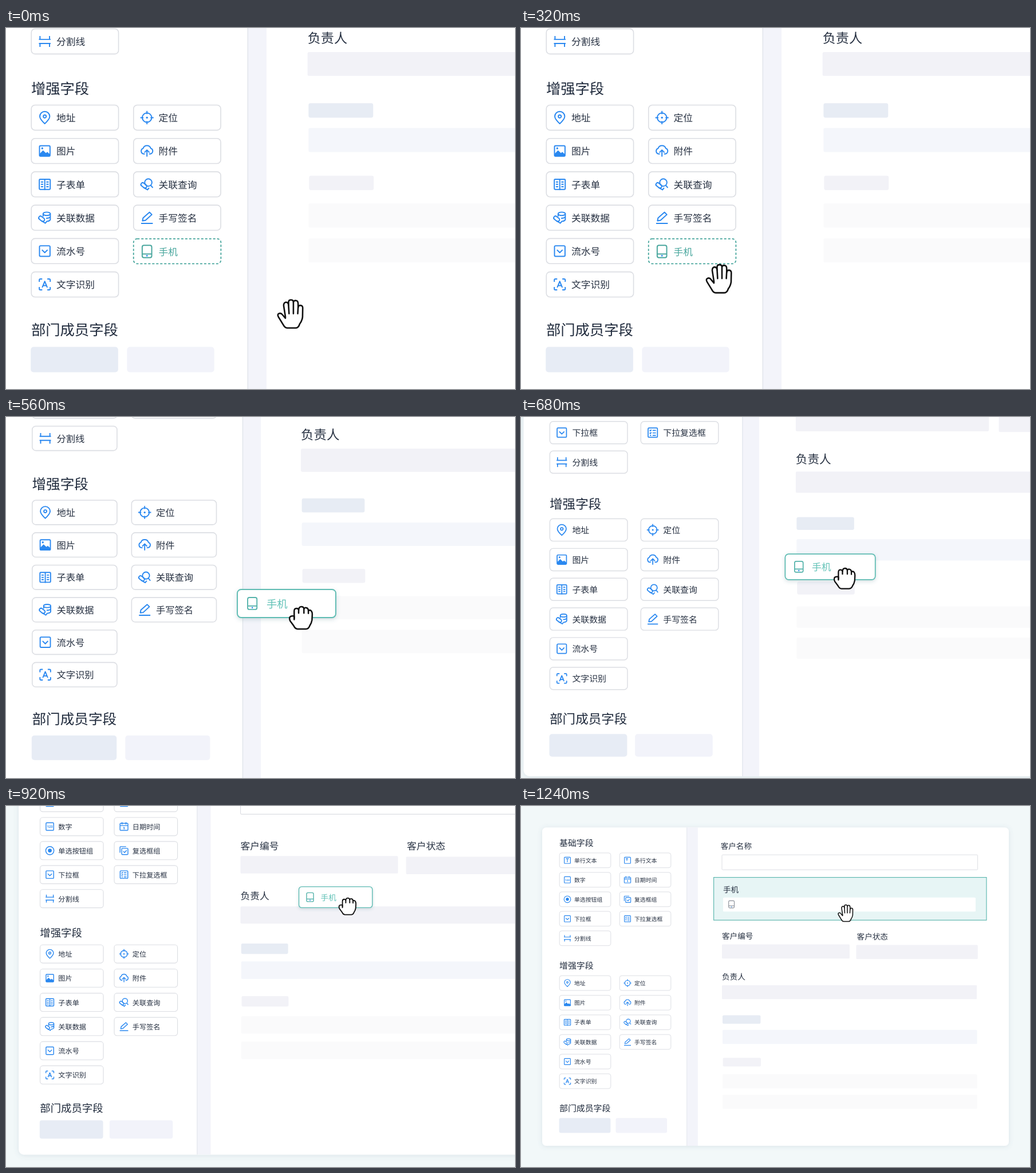
Recreate the animation shown at these times as an HTML page. Size 889 by 630 pixels, loop 2760 ms.

```html
<!DOCTYPE html>
<html lang="zh-CN">
<head>
<meta charset="utf-8">
<title>表单设计</title>
<style>
  html, body { margin: 0; width: 100%; height: 100%; overflow: hidden; background: #f2f8f9; }
  svg { display: block; width: 100%; height: 100%; }
  text { font-family: "Noto Sans CJK SC", "Noto Sans CJK", sans-serif; text-rendering: geometricPrecision; fill: #273142; }
  .head { font-weight: 500; fill: #1f2a3c; }
  .icon { fill: none; stroke: #2a88f0; stroke-width: 1.15; stroke-linejoin: round; }
  .icon .solid { fill: #2a88f0; stroke: none; }
  .icon text { font-family: "Noto Sans", sans-serif; font-weight: 700; fill: #2a88f0; stroke: none; }
  .hand { fill: #fff; stroke: #111; stroke-width: 2.6; stroke-linejoin: round; stroke-linecap: round; }
</style>
</head>
<body>
<svg viewBox="0 0 889 630" xmlns="http://www.w3.org/2000/svg">
  <defs>
    <filter id="panelShadow" x="-10%" y="-10%" width="120%" height="120%">
      <feDropShadow dx="0" dy="1" stdDeviation="4" flood-color="#5a6f8c" flood-opacity=".16"/>
    </filter>
    <filter id="cardShadow" x="-20%" y="-40%" width="140%" height="200%">
      <feDropShadow dx="0" dy="1.5" stdDeviation="2.2" flood-color="#3f6f78" flood-opacity=".22"/>
    </filter>
  </defs>
  <rect width="889" height="630" fill="#f2f8f9"/>
  <g id="camera">
    <rect x="37" y="37.5" width="815" height="555.5" rx="7" fill="#fff" filter="url(#panelShadow)"/>
    <rect x="289.5" y="37.5" width="19.3" height="555.5" fill="#f3f4fa"/>
    <path d="M289.6 37.5V593" stroke="#dfe3ea" stroke-width=".8"/>
    <g id="list"></g>
    <g id="slot"></g>
    <g id="top"></g>
    <g id="lower"></g>
    <rect id="gap" x="350.3" y="130" width="447.4" height="54" rx="2.5" fill="#fff"
      stroke="#5d998e" stroke-width="1" stroke-dasharray="4 3.6"/>
    <g id="field"></g>
    <g id="card"></g>
    <g id="hand">
      <g id="open" class="hand">
        <path d="M-9 -21L-12 -40Q-12 -45.5 -8 -46Q-4 -46 -3.5 -41V-46Q-3.5 -50 .8 -50Q5 -50 5 -46Q5.5 -49 9 -49Q13 -48.5 13.2 -44L13.3 -37Q13.6 -40.5 17.3 -40.5Q21.3 -40 21.3 -36L21 -20Q20 -13 16 -8Q14 -1 9 -1H-6Q-10 -1 -13 -7L-21 -20Q-23.5 -24.5 -20.5 -26Q-17 -28 -14 -24L-9 -18Z"/>
        <path d="M-3.5 -41L-2.6 -26M5 -46V-26M13.3 -38L12.6 -26"/>
      </g>
      <g id="fist" class="hand">
        <path d="M-12 -20V-33Q-12 -38 -8 -38Q-4.5 -38 -4 -35Q-3.5 -41 1 -41Q5 -41 5.5 -37Q7 -40 10 -39Q13.5 -38 13.5 -34Q17 -36 19 -33Q20.5 -31 20.5 -27L20 -17Q19 -11 16 -7Q14 -1 9 -1H-6Q-10 -1 -13 -7L-19 -15Q-21 -19 -20 -22Q-18 -25.5 -12 -24Z"/>
        <path d="M-4 -35V-29.5M5.5 -37V-29.5M13.5 -34V-29M-12 -24V-18"/>
      </g>
    </g>
  </g>
</svg>
<script>
const $ = id => document.getElementById(id);

const frame = '<rect x="-5.4" y="-5.4" width="10.8" height="10.8" rx="1"/>';
const dot = (x, y, r) => `<circle class="solid" cx="${x}" cy="${y}" r="${r}"/>`;
const path = d => `<path d="${d}"/>`;
const chevron = frame + path('M-2.9 -1.3L0 1.6L2.9 -1.3');
const link = '<rect x="-6.4" y="-.6" width="6.6" height="3.6" rx="1.8" transform="rotate(38 -3 1)"/>' + path('M-3.4 3.2L.6 5.6L2.2 3.6');
const phone = '<rect x="-4.9" y="-6.3" width="9.8" height="12.6" rx="1.8"/>' + path('M-4.9 2.6H4.9') + dot(0, 4.4, .8);

const icons = {
  line: frame + path('M-2.8 -2.9H2.8M0 -2.9V3.2'),
  lines: frame + path('M-3.2 -3H1.2M-1 -3V1'),
  number: frame + '<text x="0" y="1.8" font-size="4.6" text-anchor="middle">123</text>',
  date: '<rect x="-5.6" y="-4.6" width="11.2" height="10" rx="1"/>' + path('M-5.6 -1.4H5.6M-2.8 -6.2V-3M2.8 -6.2V-3M-.8 1H.2V4'),
  radio: '<circle r="5.8"/>' + dot(0, 0, 2.7),
  checks: '<rect x="-3.2" y="-3.2" width="8.8" height="8.8" rx="1"/>' + path('M-5.6 3V-4.8Q-5.6 -5.6 -4.8 -5.6H3M-1 1L.8 2.8L3.8 -.4'),
  select: chevron,
  multi: frame + path('M-3.6 -2.7L-2.8 -2L-1.6 -3.4M-3.6 .3L-2.8 1L-1.6 -.4M-3.4 3.2H-1.8M-.2 -2.6H3.6M-.2 .3H3.6M-.2 3.2H3.6'),
  divider: path('M-6 -2.1H6M-6 2.1H6M-4.9 -5.6V-2.1M4.9 -5.6V-2.1M-4.9 5.6V2.1M4.9 5.6V2.1'),
  pin: path('M0 6.2C-3 3.5 -5.1 1.4 -5.1 -1.2A5.1 5.1 0 0 1 5.1 -1.2C5.1 1.4 3 3.5 0 6.2Z') + '<circle cy="-1.2" r="1.5"/>',
  locate: '<circle r="4.8"/>' + dot(0, 0, 1) + path('M0 -6.8V-3.6M0 6.8V3.6M-6.8 0H-3.6M6.8 0H3.6'),
  picture: frame + '<path class="solid" d="M-5.4 5.4V3L-1.8 -.6L1.2 2.2L2.6 1L5.4 3.4V5.4Z"/>' + dot(-2.6, -2.7, 1),
  cloud: path('M-2.2 3H-3.4A2.9 2.9 0 0 1 -4 -2.6A4.2 4.2 0 0 1 4 -2.6A2.9 2.9 0 0 1 3.4 3H2.2M0 5.8V-.8M-2.6 1.6L0 -1L2.6 1.6'),
  book: '<rect x="-5.6" y="-5.2" width="11.2" height="10.4" rx=".8"/>' + path('M0 -5.2V5.8M-4 -2.4H-1.6M-4 0H-1.6M-4 2.4H-1.6M1.6 -2.4H4M1.6 0H4M1.6 2.4H4'),
  query: '<circle cx="1.4" cy="-1.9" r="3.7"/>' + path('M4 1L6 3.6') + link,
  data: '<ellipse cx="2" cy="-4" rx="3.7" ry="1.7"/>' + path('M-1.7 -4V-1.2M5.7 -4V2Q5 3.8 2.2 3.6M5.7 -1Q5 .6 1.4 .5') + link,
  pen: path('M-4.6 3.2L-4 .2L2.6 -5.6L5 -3.2L-1.6 2.8ZM-6 5.8H6'),
  serial: chevron,
  scan: path('M-5.6 -2.6V-4.6Q-5.6 -5.6 -4.6 -5.6H-2.6M2.6 -5.6H4.6Q5.6 -5.6 5.6 -4.6V-2.6M5.6 2.6V4.6Q5.6 5.6 4.6 5.6H2.6M-2.6 5.6H-4.6Q-5.6 5.6 -5.6 4.6V2.6M-2.6 3.2L0 -3.2L2.6 3.2M-1.7 1.2H1.7')
};

const rect = (x, y, w, h, fill, rx = 1.5, more = '') =>
  `<rect x="${x}" y="${y}" width="${w}" height="${h}" rx="${rx}" fill="${fill}" ${more}/>`;
// y is the middle of the line of text
const label = (s, x, y, size, more = '') =>
  `<text x="${x}" y="${y + size * .375}" font-size="${size}" ${more}>${s}</text>`;
const icon = (body, x, y, more = '') => `<g class="icon" transform="translate(${x} ${y})" ${more}>${body}</g>`;
const head = (s, y) => label(s, 67, y, 14.9, 'class="head"');

function item(col, y, kind, name) {
  const x = 67.2 + 105 * col;
  return rect(x, y - 12.9, 89.6, 25.8, '#fff', 3.8, 'stroke="#dcdee3" stroke-width=".95"')
    + icon(icons[kind], x + 13.8, y) + label(name, x + 25.8, y + .3, 9.85);
}

function items(rows, y0, step) {
  return rows.map((row, i) =>
    row.map(([kind, name], col) => item(col, y0 + step * i, kind, name)).join('')).join('');
}

const basic = [
  [['line', '单行文本'], ['lines', '多行文本']],
  [['number', '数字'], ['date', '日期时间']],
  [['radio', '单选按钮组'], ['checks', '复选框组']],
  [['select', '下拉框'], ['multi', '下拉复选框']],
  [['divider', '分割线']]
];
const extra = [
  [['pin', '地址'], ['locate', '定位']],
  [['picture', '图片'], ['cloud', '附件']],
  [['book', '子表单'], ['query', '关联查询']],
  [['data', '关联数据'], ['pen', '手写签名']],
  [['serial', '流水号']],
  [['scan', '文字识别']]
];

$('list').innerHTML = head('基础字段', 64.5) + items(basic, 94.8, 34)
  + head('增强字段', 278.8) + items(extra, 309, 34.25) + head('部门成员字段', 527)
  + rect(66.6, 544.4, 89.8, 26, '#e7ecf5', 3) + rect(165.5, 544.4, 89.6, 26, '#f2f3fa', 3);

$('slot').innerHTML = rect(172.2, 433.4, 89.8, 25.6, '#fff', 3.8, 'stroke="#4aa79e" stroke-width="1.05" stroke-dasharray="2.4 1.7"')
  + icon(phone, 186, 446.4, 'style="stroke:#4aa79e"') + label('手机', 198, 446.6, 9.85, 'style="fill:#4aa79e"');

$('top').innerHTML = label('客户名称', 348.7, 70, 13.6)
  + rect(351, 85.2, 446.6, 26.2, '#fff', 1.5, 'stroke="#dcdee3" stroke-width=".95"');

$('lower').innerHTML = label('客户编号', 351, 227, 13.6) + label('客户状态', 586.6, 227.6, 13.6)
  + rect(351, 241.5, 223, 24.7, '#f2f2f7') + rect(585.4, 242.4, 212.4, 24.7, '#f2f2f7')
  + label('负责人', 351, 298, 13.6) + rect(351, 312.7, 445.2, 24.4, '#f2f2f7')
  + rect(352, 365.2, 66.4, 14.8, '#e7ecf4', 2) + rect(352, 390.7, 444.6, 24.6, '#f4f6fb')
  + rect(352.6, 439.6, 66.4, 14.8, '#f2f2f7', 2)
  + rect(352, 468.2, 444.6, 24.6, '#fafafb') + rect(352, 504, 444.6, 24.6, '#fafafb');

$('field').innerHTML = rect(336.6, 124.6, 476.4, 74.6, '#e7f5f5', 0, 'stroke="#55b3ab" stroke-width="1.1"')
  + label('手机', 353, 145.8, 13.6) + rect(353, 159.8, 441, 24.4, '#fff')
  + icon(phone, 367.6, 171.6, 'style="stroke:#8b9099"');

$('card').innerHTML = rect(-52, -14.8, 104, 29.6, '#fff', 4, 'stroke="#5fbcb3" stroke-width="1.15" filter="url(#cardShadow)"')
  + icon(phone, -36.2, 0, 'style="stroke:#55b3ab"') + label('手机', -21.2, .4, 11.1, 'style="fill:#62c2b7"');

// rows of time, x, y
const reach = [[0, 333.5, 525.5], [320, 244.7, 489.4], [360, 233.6, 482]];
const haul = [[360, 233.6, 482], [560, 351, 432.6], [680, 407.3, 377.3], [840, 469.3, 287.4], [1040, 550, 213.2], [1120, 567, 202]];
const carry = [[360, 217, 446.4], [560, 335.9, 405.1], [680, 390.8, 351.5], [840, 449.3, 264], [1040, 540, 183], [1120, 558, 166]];

const clamp = (v, a = 0, b = 1) => Math.min(b, Math.max(a, v));
const ramp = (t, a, b) => clamp((t - a) / (b - a));

function segment(keys, t) {
  let i = 0;
  while (i < keys.length - 2 && t >= keys[i + 1][0]) i++;
  return i;
}

function linear(keys, t) {
  const i = segment(keys, t), a = keys[i], b = keys[i + 1], u = ramp(t, a[0], b[0]);
  return [1, 2].map(n => a[n] + (b[n] - a[n]) * u);
}

function smooth(keys, t) {
  const i = segment(keys, t), a = keys[i], b = keys[i + 1], d = b[0] - a[0], u = ramp(t, a[0], b[0]);
  const slope = (k, n) => {
    const p = keys[Math.max(k - 1, 0)], q = keys[Math.min(k + 1, keys.length - 1)];
    return (q[n] - p[n]) / (q[0] - p[0]);
  };
  return [1, 2].map(n => {
    const w = u * u * (3 - 2 * u);
    return a[n] + (b[n] - a[n]) * w
      + d * u * (1 - u) * ((1 - u) * slope(i, n) - u * slope(i + 1, n));
  });
}

const move = (id, [x, y], more = '') => $(id).setAttribute('transform', `translate(${x} ${y})${more}`);
const fade = (id, v) => {
  $(id).setAttribute('opacity', v);
  $(id).style.display = v ? '' : 'none';
};

const LOOP = 2760, STEP = 40, GRAB = 360, DROP = 1200;
const PIVOT = [100, 527];

function draw(time) {
  const t = Math.floor((time % LOOP) / STEP) * STEP;
  const zoom = 1.7 - .7 * ramp(t, 520, 1120);
  const held = t >= GRAB && t < DROP;
  const u = ramp(t, 920, 1000), spread = u * u * (3 - 2 * u);

  move('camera', PIVOT.map(p => p * (1 - zoom)), ` scale(${zoom})`);
  move('lower', [0, -71 * (1 - spread)]);
  move('hand', t < GRAB ? linear(reach, t) : smooth(haul, t), ' scale(.588)');
  move('card', smooth(carry, t));
  fade('slot', t < GRAB ? 1 : 0);
  fade('card', held ? 1 : 0);
  fade('fist', held ? 1 : 0);
  fade('open', held ? 0 : 1);
  fade('gap', t < DROP ? spread : 0);
  fade('field', t < DROP ? 0 : t < DROP + STEP ? .5 : 1);
}

const start = performance.now();
function tick() {
  draw(performance.now() - start);
  requestAnimationFrame(tick);
}
tick();
</script>
</body>
</html>
```
